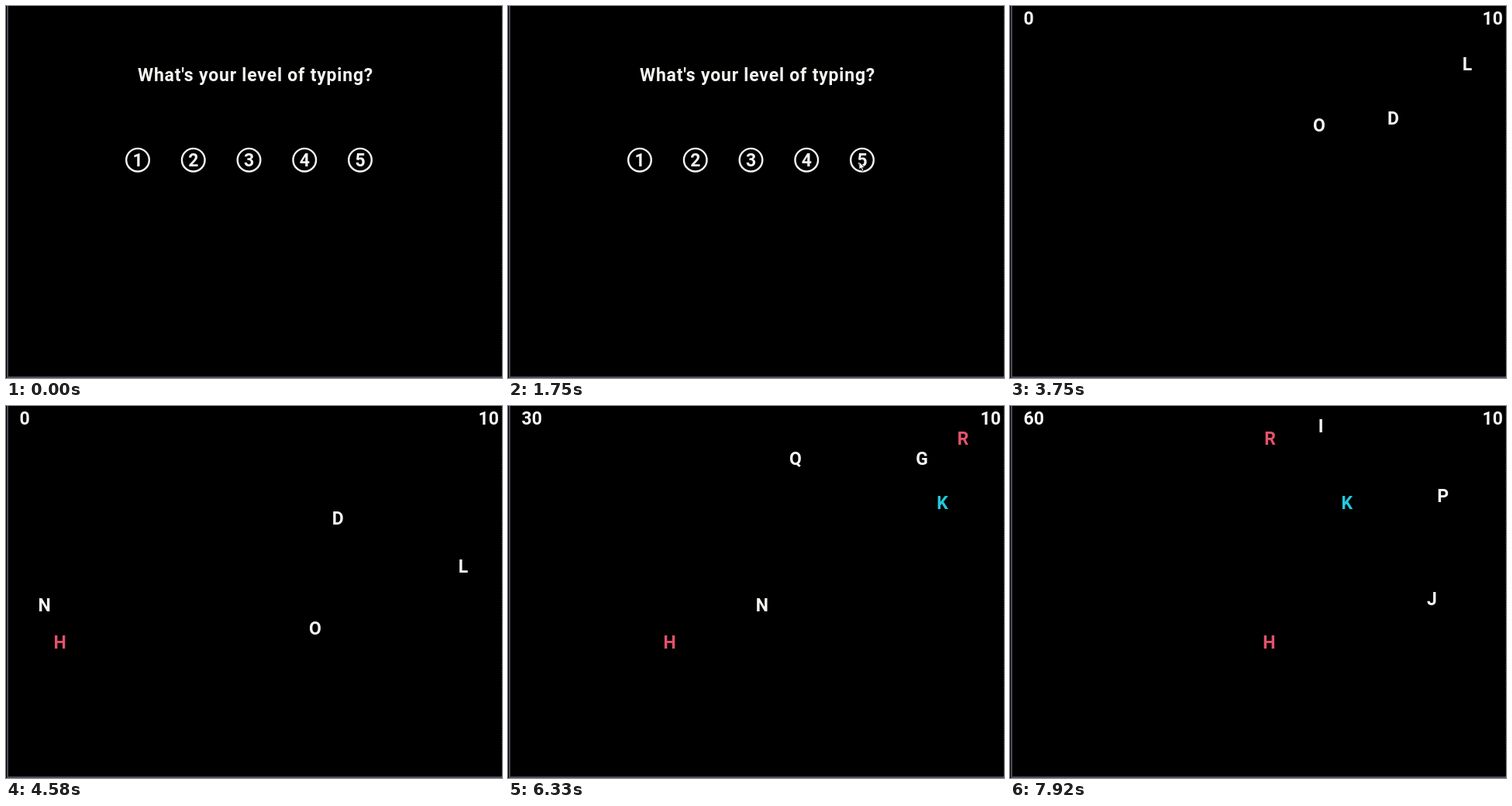
An HTML page that plays this animation: 640 by 480 pixels, repeating every 8000 ms.

```html
<!DOCTYPE html>
<html lang="en">
<head>
<meta charset="utf-8">
<title>Typing game</title>
<style>
  html, body { margin: 0; width: 100%; height: 100%; overflow: hidden; background: #000; }
  svg { display: block; width: 100vw; height: 100vh; }
  text { font: bold 23px Roboto, "Liberation Sans", sans-serif; fill: #f6f5f2; }
  .mid { text-anchor: middle; }
  .ring { fill: none; stroke: #f6f5f2; stroke-width: 2.4; }
  .edge { fill: none; stroke: #4c4c5c; stroke-width: 2; }
  .faint { stroke: #2a2a34; stroke-width: 1; stroke-dasharray: 1 2; }
  .red { fill: #e2536a; }
  .teal { fill: #22c8dc; }
</style>
</head>
<body>
<svg viewBox="0 0 640 480">
  <path class="edge" d="M2 0V479H640"/>
  <path class="edge faint" d="M639.5 0V478"/>
  <g id="menu">
    <text x="170" y="96.5" letter-spacing=".8">What's your level of typing?</text>
    <g id="levels"></g>
    <path id="cursor" d="M0 0V10L2.4 8L4.2 12L6 11.2L4.3 7.4H7.4Z" fill="#f6f5f2" stroke="#000" stroke-width=".8"/>
  </g>
  <g id="hud">
    <text id="score" x="17.5" y="24.2">0</text>
    <text x="636" y="24.2" text-anchor="end">10</text>
  </g>
  <g id="letters"></g>
</svg>
<script>
  const LOOP = 8000, FPS = 12;
  const MENU_END = 22, HUD_START = 26, FIRST_LETTER = 28;
  const SLOW = 6.62, FAST = 2 * SLOW, GAP = 6;
  const keyTicks = [58, 61, 64, 79, 82, 88];
  const $ = id => document.getElementById(id);

  // Each side: where a letter starts and which way it drifts
  const sides = {
    left: { start: 10, dir: 1, across: true },
    right: { start: 607, dir: -1, across: true },
    top: { start: 9, dir: 1 },
    bottom: { start: 448, dir: -1 }
  };

  function add(parent, tag, attrs, label = '') {
    const el = document.createElementNS('http://www.w3.org/2000/svg', tag);
    for (const key in attrs) el.setAttribute(key, attrs[key]);
    el.textContent = label;
    parent.append(el);
    return el;
  }

  const show = (el, on) => el.setAttribute('visibility', on ? 'visible' : 'hidden');
  const move = (el, x, y) => el.setAttribute('transform', `translate(${x} ${y})`);

  for (let i = 0; i < 5; i++) {
    const x = 170 + i * 71.75;
    add($('levels'), 'circle', { class: 'ring', cx: x, cy: 198.7, r: 14.8 });
    add($('levels'), 'text', { class: 'mid', x, y: 207 }, i + 1);
  }

  let clock = FIRST_LETTER, plain = 0;

  // Plain letters are typed in order of arrival; coloured ones are left alone
  function spawn(char, side, lane, speed, gap = GAP, tint = '') {
    const el = add($('letters'), 'text', { class: 'mid ' + tint, y: 7.8 }, char);
    const typed = (tint ? null : keyTicks[plain++]) ?? Infinity;
    const letter = { el, lane, speed, ...sides[side], born: clock, typed };
    clock += gap;
    return letter;
  }

  const letters = [
    spawn('D', 'right', 145.5, SLOW),
    spawn('O', 'top', 399, FAST),
    spawn('L', 'top', 590, FAST),
    spawn('H', 'left', 305.5, SLOW, GAP, 'red'),
    spawn('N', 'left', 257, FAST, 13),
    spawn('G', 'right', 68.5, SLOW, 2),
    spawn('Q', 'top', 371, SLOW, 2),
    spawn('K', 'right', 125, SLOW, 5.5, 'teal'),
    spawn('R', 'right', 42, FAST, 5.5, 'red'),
    spawn('J', 'bottom', 544.5, FAST, 7.7),
    spawn('P', 'right', 116, SLOW),
    spawn('I', 'top', 401, FAST)
  ];

  function moveCursor(tick) {
    const p = Math.min(1, Math.max(0, (tick - 8) / 10));
    const left = (1 - p) ** 2;
    move($('cursor'), 453 + 170 * left, 201 + 265 * left);
    show($('cursor'), tick >= 8 && tick < MENU_END);
  }

  function moveLetter(l, tick) {
    const pos = l.start + l.dir * l.speed * (tick - l.born);
    move(l.el, ...(l.across ? [pos, l.lane] : [l.lane, pos]));
    show(l.el, tick >= l.born && tick < l.typed);
  }

  function draw(ms) {
    const tick = Math.floor((ms % LOOP + 4) * FPS / 1000) % (LOOP * FPS / 1000);
    show($('menu'), tick < MENU_END);
    show($('hud'), tick >= HUD_START);
    moveCursor(tick);
    letters.forEach(l => moveLetter(l, tick));
    $('score').textContent = 10 * keyTicks.filter(k => k <= tick).length;
  }

  const start = performance.now();
  function loop() {
    draw(performance.now() - start);
    requestAnimationFrame(loop);
  }
  loop();
</script>
</body>
</html>
```
